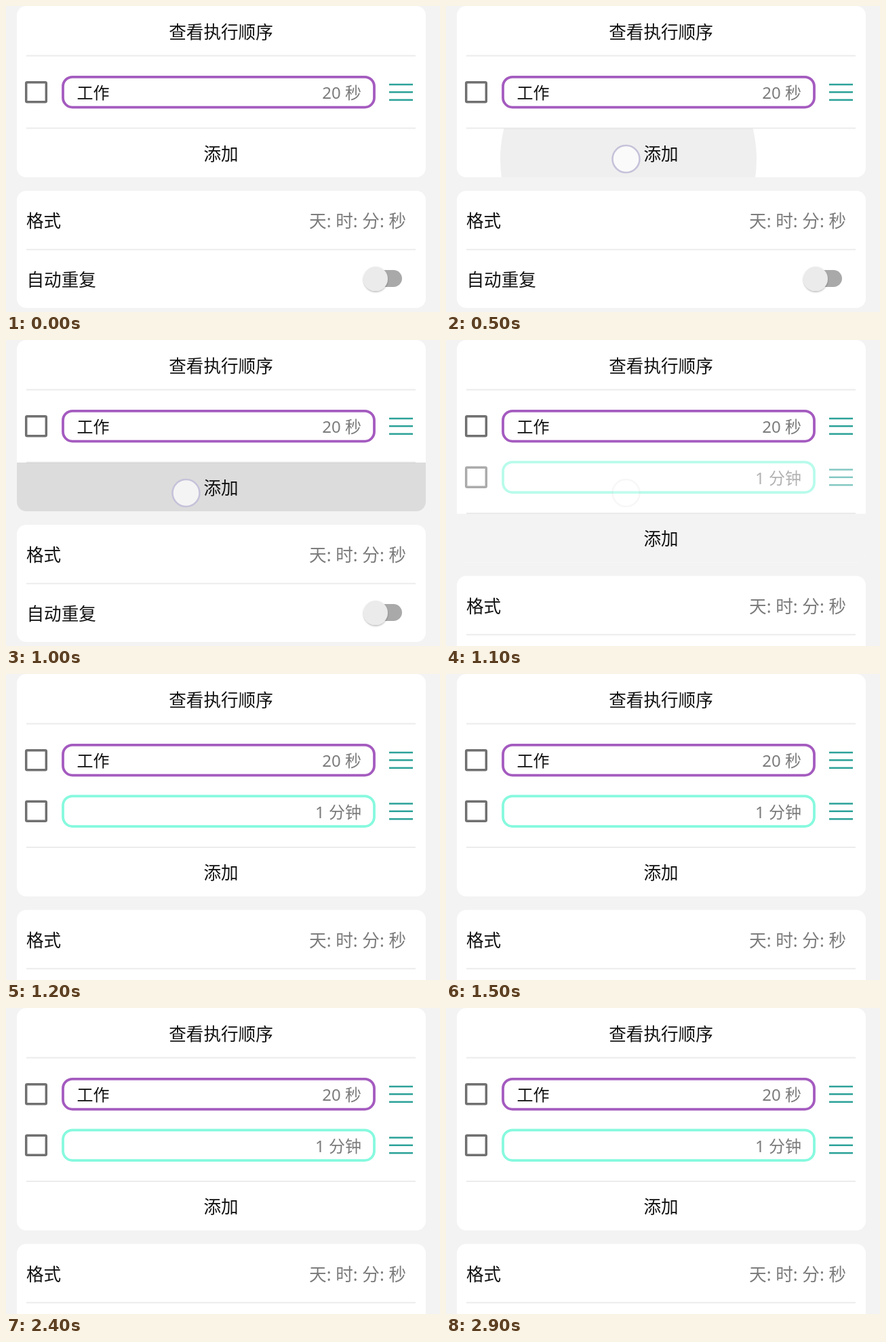
Write an HTML page that moves like this. It is 640 by 452 pixels and loops after 3000 ms.

```html
<!DOCTYPE html>
<html lang="zh-CN">
<head>
<meta charset="utf-8">
<style>
  html, body { margin: 0; width: 100%; height: 100%; overflow: hidden; background: #f3f3f3; }
  svg { display: block; width: 640px; height: 452px; font: 25.6px "Noto Sans", "Noto Sans CJK SC", "Noto Sans CJK", sans-serif; fill: #111; }
  .card { fill: #fff; }
  .line { stroke: #ececec; stroke-width: 2; }
  .mid { text-anchor: middle; }
  .end { text-anchor: end; fill: #7b7b7b; }
  .small { font-size: 24px; }
  .box { fill: none; stroke: #707070; stroke-width: 3.5; }
  .pill { fill: none; stroke-width: 3.8; }
  .grip { stroke: #2ba198; stroke-width: 2.6; }
</style>
</head>
<body>
<svg viewBox="0 0 640 452">
  <defs>
    <clipPath id="addArea"><path d="M16 181H619V239a14 14 0 0 1-14 14H30a14 14 0 0 1-14-14Z"/></clipPath>
    <filter id="shadow" x="-30%" y="-30%" width="160%" height="160%">
      <feDropShadow dx="0" dy="1.5" stdDeviation="1.2" flood-opacity=".28"/>
    </filter>
    <g id="controls">
      <rect class="box" x="29.7" y="112.7" width="29.6" height="29" rx="1.5"/>
      <path class="grip" d="M565 116H600M565 127.3H600M565 138.7H600"/>
    </g>
    <rect id="pill" class="pill" x="84" y="104.8" width="459" height="44.8" rx="14"/>
  </defs>

  <rect id="card" class="card" x="16" width="603" height="253" rx="14"/>
  <text class="mid" x="317" y="47.5">查看执行顺序</text>
  <path class="line" d="M30 73.5H604"/>

  <use href="#controls"/>
  <use href="#pill" stroke="#a45bbf"/>
  <text class="small" x="104.5" y="137.3">工作</text>
  <text class="end small" x="524" y="137.3">20 秒</text>

  <g id="newRow" transform="translate(0 75.5)">
    <use href="#controls"/>
    <use href="#pill" stroke="#86f9de"/>
    <text class="end small" x="524" y="137.3">1 分钟</text>
  </g>

  <g id="below">
    <path class="line" d="M30 180.5H604"/>
    <g clip-path="url(#addArea)"><circle id="ripple" cx="269" cy="226" fill="#000004"/></g>
    <text class="mid" x="317" y="227.5">添加</text>

    <rect class="card" x="16" y="273" width="603" height="173" rx="14"/>
    <text x="30" y="327">格式</text>
    <text class="end" x="590" y="327">天: 时: 分: 秒</text>
    <path class="line" d="M30 359.8H604"/>
    <text x="30.5" y="413.5">自动重复</text>
    <rect x="534" y="390" width="50" height="25" rx="12.5" fill="#a9a9a9"/>
    <circle cx="545" cy="403" r="18" fill="#ebebeb" filter="url(#shadow)"/>
  </g>

  <circle id="touch" cx="265.5" cy="226" r="20" fill="#fff" fill-opacity=".7" stroke="#c6c2da" stroke-width="2.6"/>
</svg>
<script>
  const LOOP = 3000, STEP = 100, ROW = 75.5;
  const PRESS = 400, RELEASE = 1000, ADDED = 1100;
  const el = id => document.getElementById(id);
  const set = (id, attrs) => Object.entries(attrs).forEach(([k, v]) => el(id).setAttribute(k, v));
  const clamp = v => Math.max(0, Math.min(1, v));

  function draw(now) {
    // the screen refreshes ten times a second
    const t = Math.floor((now % LOOP) / STEP) * STEP;
    const added = t >= ADDED;
    const held = t >= PRESS && !added;
    const fade = clamp(1 - (t - RELEASE) / 150);
    const shift = added ? ROW : 0;

    set('card', { height: 253 + shift });
    set('below', { transform: `translate(0 ${shift})` });
    set('newRow', { opacity: added ? clamp(0.58 + (t - ADDED) / 240) : 0 });

    const press = clamp((t - PRESS) / (RELEASE - PRESS));
    set('ripple', {
      r: Math.max(0, 70 + (t - PRESS) * 1.19),
      opacity: held ? 0.05 + 0.086 * press : added ? 0.14 * fade : 0
    });
    set('touch', { opacity: held ? 1 : added ? 0.6 * fade : 0, stroke: added ? '#d8d8d8' : '#c6c2da' });
    requestAnimationFrame(() => draw(performance.now() - start));
  }

  const start = performance.now();
  draw(0);
</script>
</body>
</html>
```
